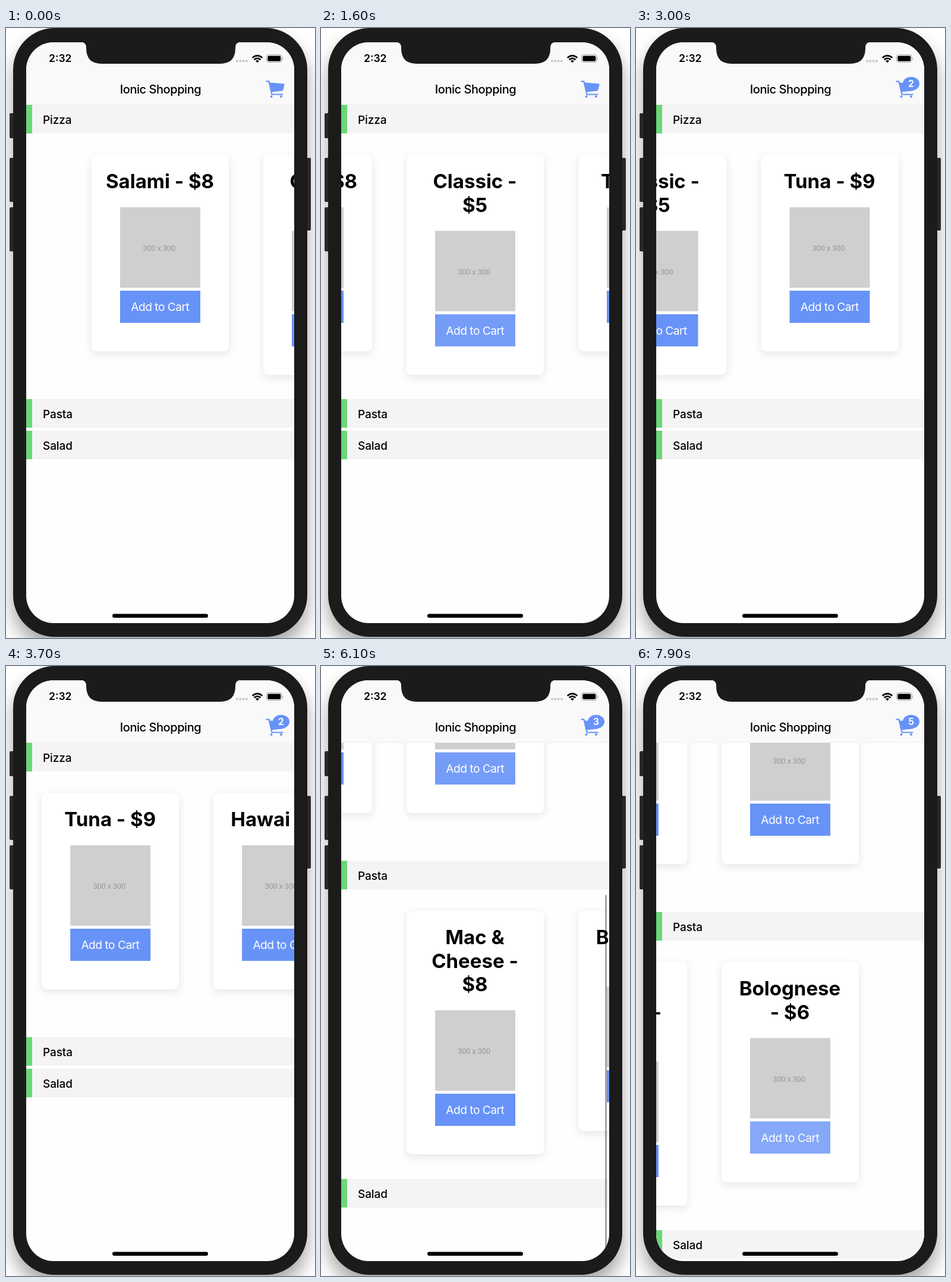
An HTML page that plays this animation: 520x1024 px, repeating every 8000 ms.

```html
<!DOCTYPE html>
<html lang="en">
<head>
<meta charset="utf-8">
<title>Ionic Shopping</title>
<style>
  html, body { margin: 0; width: 100%; height: 100%; overflow: hidden; background: #fff; }
  #stage { position: relative; width: 520px; height: 1024px; overflow: hidden; }
  .body {
    position: absolute; left: 12px; top: 0; width: 495px; height: 1022px;
    border-radius: 70px; background: #1b1b1b; box-shadow: 0 18px 30px rgba(0, 0, 0, .36);
  }
  .key { position: absolute; width: 8px; border-radius: 2px; background: #303030; }
  svg { position: absolute; left: 0; top: 0; }
  text { font-family: Inter, "Open Sans", sans-serif; }
  .mid { text-anchor: middle; }
  .name { font-size: 33px; font-weight: 700; }
  .size { font: 13px Roboto, sans-serif; letter-spacing: -.25px; fill: #989898; }
  .label { font-size: 19.2px; letter-spacing: -.5px; fill: #fff; }
  .row { font-size: 19px; font-weight: 500; letter-spacing: -.1px; }
  .card { fill: #fff; filter: drop-shadow(0 4px 7px rgba(0, 0, 0, .1)); }
</style>
</head>
<body>
<div id="stage">
  <div class="key" style="left:6px;top:143px;height:42px"></div>
  <div class="key" style="left:6px;top:218px;height:74px"></div>
  <div class="key" style="left:6px;top:301px;height:74px"></div>
  <div class="key" style="left:505px;top:218px;height:122px"></div>
  <div class="body"></div>
  <svg width="520" height="1024" viewBox="0 0 520 1024">
    <defs>
      <clipPath id="screen"><rect x="34" y="24" width="451" height="975" rx="46"/></clipPath>
    </defs>
    <g clip-path="url(#screen)">
      <rect x="34" y="24" width="451" height="975" fill="#fefefe"/>
      <g id="content"></g>
      <rect id="bar" x="478" width="3" rx="1.5" fill="#000"/>
      <rect x="34" y="24" width="451" height="105" fill="#f9f9f9"/>
      <rect x="34" y="128.5" width="451" height=".5" fill="#e6e6e6"/>
      <path d="M126 23.5Q135 24 135 33V34Q135 60 161 60H360Q386 60 386 34V33Q386 24 395 23.5Z" fill="#1b1b1b"/>
      <rect x="179" y="983.5" width="161" height="6.5" rx="3.2"/>
    </g>
    <text x="72" y="57" font-size="17.5" font-weight="600">2:32</text>
    <text class="mid" x="260" y="110" font-size="20" font-weight="500" letter-spacing="-.45">Ionic Shopping</text>
    <g fill="#c6c6c6">
      <circle cx="389" cy="55.5" r="2"/><circle cx="394.3" cy="55.5" r="2"/>
      <circle cx="399.6" cy="55.5" r="2"/><circle cx="404.9" cy="55.5" r="2"/>
    </g>
    <g fill="none" stroke="#000" stroke-width="2.6">
      <path d="M414.7 50Q423 42.6 431.300 50M417.600 53.300Q423 48.600 428.400 53.300"/>
      <path d="M420 55.200Q423 52.800 426 55.200L423 58.200Z" fill="#000" stroke="none"/>
    </g>
    <rect x="438.5" y="45" width="25.500" height="12.500" rx="3.500" fill="none" stroke="#9a9a9a"/>
    <rect x="440.300" y="46.800" width="22" height="9" rx="2"/>
    <path d="M465.500 49V54Q467.300 51.500 465.500 49Z" fill="#9a9a9a"/>
    <g fill="#6793f8">
      <path d="M438.500 89.700H442.500L447.500 111.500H465.500" fill="none" stroke="#6793f8" stroke-width="2.200" stroke-linecap="round" stroke-linejoin="round"/>
      <path d="M443 91.500L467.500 93.500Q468.800 93.700 468.500 95L466.500 104.200Q466.200 105.300 465 105.400L446.500 107.500Z"/>
      <circle cx="446.500" cy="115" r="2"/><circle cx="463" cy="115" r="2"/>
    </g>
    <g id="badge">
      <ellipse cx="463" cy="93.500" rx="14" ry="11.500" fill="#6793f8"/>
      <text id="count" class="mid" x="463" y="99" font-size="15.500" font-weight="700" fill="#fff"></text>
    </g>
  </svg>
</div>
<script>
const LOOP = 8000, STEP = 100, PITCH = 289, LINE = 39.5;
const $ = id => document.getElementById(id);

function add(parent, tag, attrs, text) {
  const el = document.createElementNS('http://www.w3.org/2000/svg', tag);
  for (const k in attrs) el.setAttribute(k, attrs[k]);
  if (text) el.textContent = text;
  parent.append(el);
  return el;
}

function addRow(y, name) {
  const g = add($('content'), 'g', { transform: `translate(0 ${y})` });
  add(g, 'rect', { x: 34, width: 451, height: 48, fill: '#f4f4f4' });
  add(g, 'rect', { x: 34, width: 10, height: 48, fill: '#69d878' });
  add(g, 'text', { x: 62, y: 32, class: 'row' }, name);
  return g;
}

// Builds one product card and returns its button.
function addCard(parent, index, top, lines) {
  const g = add(parent, 'g', { transform: `translate(${144 + index * PITCH} ${top})` });
  const extra = (lines.length - 1) * LINE;
  add(g, 'rect', { width: 231, height: 330 + extra, rx: 9, class: 'card' });
  lines.forEach((s, i) => add(g, 'text', { x: 115, y: 56 + i * LINE, class: 'mid name' }, s));
  const lower = add(g, 'g', { transform: `translate(0 ${extra})` });
  add(lower, 'rect', { x: 48, y: 88, width: 135, height: 135, fill: '#cfcfcf' });
  add(lower, 'text', { x: 113.5, y: 161, class: 'mid size' }, '300 x 300');
  const button = add(lower, 'g', {});
  add(button, 'rect', { x: 48, y: 228, width: 135, height: 54, fill: '#6793f8' });
  add(button, 'text', { x: 115.3, y: 262, class: 'mid label' }, 'Add to Cart');
  return button;
}

function addSlides(top, cards) {
  const g = add($('content'), 'g', {});
  return { g, buttons: cards.map((lines, i) => addCard(g, i, top, lines)) };
}

addRow(129, 'Pizza');
const pizza = addSlides(213, [['Salami - $8'], ['Classic -', '$5'], ['Tuna - $9'], ['Hawai - $7']]);
addRow(623, 'Pasta');
const pasta = addSlides(707, [['Mac &', 'Cheese -', '$8'], ['Bolognese', '- $6']]);
const salad = addRow(676, 'Salad');

// Swipe progress per step
const SLOW = [.04, .15, .34, .56, .77, .91, .98, 1];
const MID = [.05, .2, .45, .72, .91, .98, 1];
const FAST = [.29, .69, .91, .98, 1];

function swipe(t, start, curve) {
  const k = Math.floor((t - start) / STEP);
  return k < 0 ? 0 : curve[Math.min(k, curve.length - 1)];
}

// Linear interpolation through [time, value] points
function track(t, points) {
  let [t0, v0] = points[0];
  for (const [t1, v1] of points) {
    if (t < t1) return t <= t0 ? v0 : v0 + (v1 - v0) * (t - t0) / (t1 - t0);
    [t0, v0] = [t1, v1];
  }
  return v0;
}

const OPEN = 4900, MAX_SCROLL = 210;
const CLICKS = [1800, 2200, 4600, 7500, 7800];
const SCROLL = [[5500, 0], [5600, 26], [5700, 96], [5800, 178], [5900, 243], [6000, 283],
  [6100, 296], [6200, 264], [6300, 231], [6400, 214], [6500, 210]];
const BAR = [[5500, 0], [5600, .35], [6600, .35], [6900, 0]];
const CLASSIC = [[1500, 1], [1700, .8], [1800, .9], [1900, .84], [2000, .8], [2100, .9], [2300, .8], [2600, .8], [2800, 1]];
const HAWAI = [[4300, 1], [4500, .8], [4600, .9], [4700, .8], [4800, .8], [5000, 1],
  [6000, 1], [6100, .9], [6200, .8], [6300, .8], [6500, 1]];
const BOLOGNESE = [[7200, 1], [7400, .8], [7500, .9], [7600, .8], [7700, .83], [7800, .9], [7900, .8]];

function draw(t) {
  const px = swipe(t, 400, SLOW) + swipe(t, 2600, SLOW) + swipe(t, 3700, FAST);
  pizza.g.setAttribute('transform', `translate(${-PITCH * px} 0)`);
  pasta.g.setAttribute('transform', `translate(${-PITCH * swipe(t, 6500, MID)} 0)`);

  const open = t >= OPEN;
  pasta.g.setAttribute('visibility', open ? 'visible' : 'hidden');
  salad.setAttribute('transform', `translate(0 ${open ? 1157 : 676})`);

  const y = track(t, SCROLL);
  $('content').setAttribute('transform', `translate(0 ${-y})`);
  const over = Math.max(0, y - MAX_SCROLL);
  const top = 129 + (y - over) * 870 / 1080 + over;
  $('bar').setAttribute('y', top);
  $('bar').setAttribute('height', Math.min(700, 997 - top));
  $('bar').setAttribute('opacity', track(t, BAR));

  pizza.buttons[1].setAttribute('opacity', track(t, CLASSIC));
  pizza.buttons[3].setAttribute('opacity', track(t, HAWAI));
  pasta.buttons[1].setAttribute('opacity', track(t, BOLOGNESE));

  const count = CLICKS.filter(c => c <= t).length;
  $('badge').setAttribute('visibility', count ? 'visible' : 'hidden');
  $('count').textContent = count;
}

const begin = performance.now();
function tick() {
  const t = (performance.now() - begin) % LOOP;
  draw(Math.floor(t / STEP) * STEP);
  requestAnimationFrame(tick);
}
tick();
</script>
</body>
</html>
```
